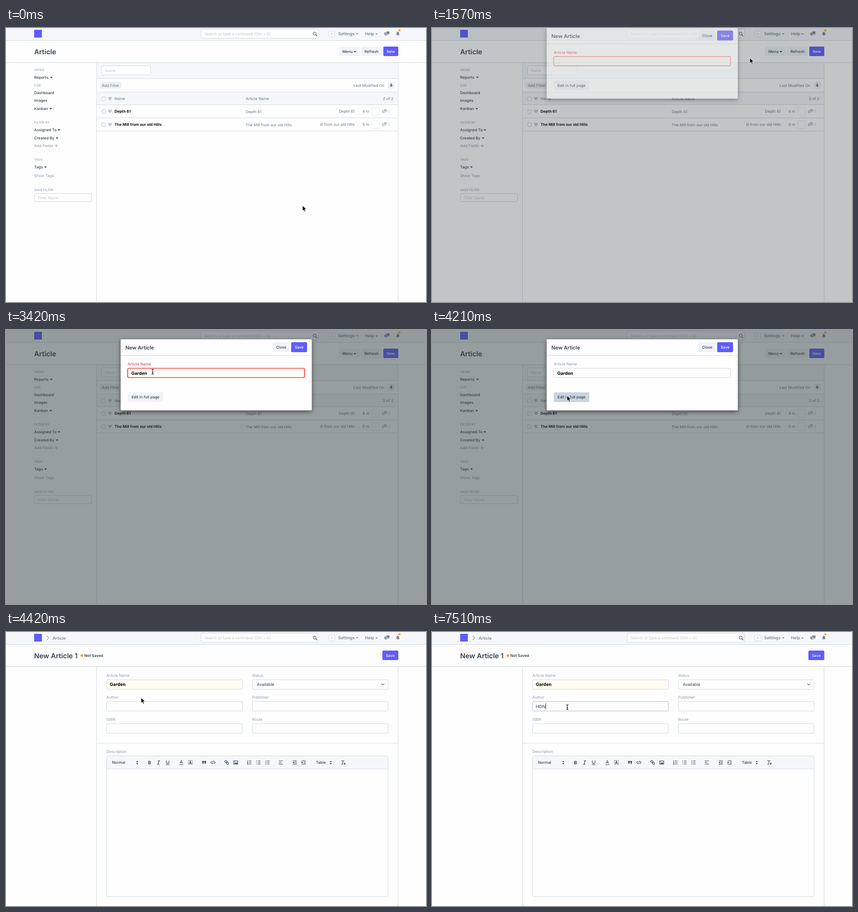
Animation, 925 px wide and 605 px high, one loop 7990 ms. Source, as an HTML page:

```html
<!DOCTYPE html>
<html lang="en">
<head>
<meta charset="utf-8">
<title>New article</title>
<style>
html, body { margin: 0; width: 925px; height: 605px; overflow: hidden; background: #fefefe; }
svg { display: block; font-family: Inter, "Noto Sans", sans-serif; text-rendering: geometricPrecision; }
text { white-space: pre; }
.sheet { filter: drop-shadow(0 3.5px 5px rgba(0, 0, 0, .55)); }
</style>
</head>
<body>
<svg id="stage" width="925" height="605" viewBox="0 0 925 605"></svg>
<script>
const LOOP = 7990;
const INK = '#36414c', GRAY = '#8d99a6', PALE = '#c3cad1', LINE = '#d1d8dd';
const BAR = '#f5f7fa', PAGE = '#fefefe', BLUE = '#5e5cff', BTN = '#f0f4f7', RED = '#f5363b';

// Building blocks; text is placed by the middle of its capitals
const T = (x, mid, s, o = {}) => {
  const { size = 8.4, fill = INK, w = 400, end, id } = o;
  return `<text ${id ? `id="${id}"` : ''} x="${x}" y="${mid + size * .364}" font-size="${size}" fill="${fill}"
    font-weight="${w}" text-anchor="${end === 'mid' ? 'middle' : end ? 'end' : 'start'}">${s}</text>`;
};
const R = (x, y, w, h, fill, o = {}) =>
  `<rect x="${x}" y="${y}" width="${w}" height="${h}" fill="${fill}" rx="${o.r || 0}"
    stroke="${o.line || 'none'}" stroke-width="${o.lw || 1}" ${o.more || ''}/>`;
const P = (d, color = INK, w = 1, more = '') =>
  `<path d="${d}" fill="none" stroke="${color}" stroke-width="${w}" ${more}/>`;
const F = (d, fill = INK) => `<path d="${d}" fill="${fill}"/>`;
const down = (x, y, fill = INK) => F(`M${x - 3} ${y - 1.4}h6l-3 3.2z`, fill);
const field = (x, y, w, h, o = {}) =>
  R(x + .5, y + .5, w - 1, h - 1, o.fill || PAGE, { r: 2.5, line: o.line || LINE, more: o.more });
const button = (x, y, w, h, s, o = {}) =>
  R(x, y, w, h, o.fill || BTN, { r: 2.5, more: o.id ? `id="${o.id}"` : '' }) +
  T(o.tx || x + w / 2, y + h / 2, s, { end: 'mid', fill: o.ink || INK, w: 500 });
const chat = (x, y, c) =>
  F(`M${x + 4} ${y}h7v5.5h-1.2v2.2l-2.2-2.2h-3.6z`, c) +
  F(`M${x} ${y + 2.5}h3.2v3.8h4v1.6h-3l-2.2 2v-2h-2z`, c);
const heart = (x, y) =>
  F(`M${x} ${y + 4}C${x - 8} ${y - 1.5} ${x - 3} ${y - 6.5} ${x} ${y - 2.4}C${x + 3} ${y - 6.5} ${x + 8} ${y - 1.5} ${x} ${y + 4}z`, PALE);
const check = y => R(210.8, y - 3.6, 8, 8, PAGE, { r: 1.8, line: '#bcc4cb' });

function navbar() {
  return R(0, 0, 925, 27, BAR) + P('M0 27.5H925', LINE) +
    R(62, 4, 17, 17, BLUE) +
    field(429, 2, 260, 21) +
    T(437, 13, 'Search or type a command (Ctrl + G)', { fill: '#bcc3ca' }) +
    `<circle cx="679.8" cy="12.3" r="3.3" fill="none" stroke="${INK}"/>` + P('M682.2 14.8l3.2 3.2', INK, 1.3) +
    R(711, 6.5, 13, 13, PAGE, { r: 2, line: LINE }) +
    T(717.5, 13, 'A', { end: 'mid', fill: PALE }) +
    T(731.5, 13, 'Settings', { size: 9.1, w: 600, fill: '#7b8793' }) + down(773.5, 13, GRAY) +
    T(790.5, 13, 'Help', { size: 9.1, w: 600, fill: '#7b8793' }) + down(816, 13.4, GRAY) +
    chat(833.5, 7.6, '#7b8793') +
    F('M859 15.6c1.4-1.2 1-3 1.4-4.8c.4-1.8 1.4-2.4 2.6-2.6c1.2.2 2.2.8 2.6 2.6c.4 1.8 0 3.6 1.4 4.8zM861.8 16.2h2.4c-.2 1.4-2.2 1.4-2.4 0z', '#7b8793') +
    '<circle cx="866.5" cy="5.2" r="2.3" fill="#ff9c00"/>' +
    P('M0 76.5H925', LINE);
}

function sidebar() {
  const heads = [[92, 'VIEWS'], [208, 'FILTER BY'], [290, 'TAGS'], [357, 'SAVE FILTER']];
  const links = [[109, 'Reports', 100], [126, 'List'], [143, 'Dashboard'], [160, 'Images'], [178, 'Kanban', 98.5],
    [225, 'Assigned To', 116.5], [243, 'Created By', 112.5], [260, 'Add Fields'], [307, 'Tags', 87], [326, 'Show Tags']];
  const dim = ['List', 'Add Fields', 'Show Tags'];
  return heads.map(([y, s]) => T(62, y, s, { size: 7, fill: GRAY })).join('') +
    links.map(([y, s, c]) => T(62, y, s, { fill: dim.includes(s) ? GRAY : INK, w: dim.includes(s) ? 400 : 500 }) +
      (c ? down(c, y + .2) : '')).join('') +
    P('M107.5 260h6.4M110.7 256.8v6.4', GRAY) +
    field(62, 365, 127, 19) + T(70, 375, 'Filter Name', { fill: PALE });
}

function listRow(y, name, age, clip) {
  return check(y) + heart(229, y) +
    T(239, y, name, { w: 700, fill: '#111' }) +
    T(528, y + 1, name, { fill: '#6c7680' }) +
    `<g clip-path="url(#cut)">${T(768, y, clip, { end: 1, fill: '#6c7680' })}</g>` +
    T(800, y, age, { end: 1, fill: '#6c7680' }) +
    R(805.5, y - 8.2, 17, 17, 'none', { r: 2, line: LINE, more: 'stroke-dasharray="2 1.4"' }) +
    chat(828, y - 5, PALE) + T(841, y, '0', { fill: PALE }) +
    P(`M200 ${y + 14.5}H863`, LINE);
}

function listPage() {
  return T(62, 52, 'Article', { size: 15.2, w: 600 }) +
    button(734, 41, 45, 21, 'Menu', { tx: 752 }) + down(768.5, 52.4) +
    button(782, 41, 46, 21, 'Refresh') +
    button(831, 41, 33, 21, 'New', { fill: BLUE, ink: '#fff', id: 'newBtn' }) +
    sidebar() +
    R(200, 77, 663, 34, BAR) + R(200, 142, 663, 28, BAR) +
    P('M199.5 77V605M863.5 77V605M200 111.5H863M200 141.5H863M200 169.5H863', LINE) +
    field(210, 83, 109, 21) + T(218, 94, 'Name', { fill: PALE }) +
    R(207, 119, 47, 15, '#edf1f4', { r: 2 }) + T(211, 127, 'Add Filter', { fill: '#6c7680' }) +
    T(833, 127, 'Last Modified On', { end: 1, fill: '#6c7680' }) +
    R(841, 119, 15, 15, '#edf1f4', { r: 2 }) +
    F('M847 122.5h2.6v3.6h2.4l-3.7 4.2l-3.7-4.2h2.4z', '#6c7680') +
    check(156) + heart(229, 156) +
    T(239, 156, 'Name', { fill: '#6c7680' }) + T(528, 156, 'Article Name', { fill: '#6c7680' }) +
    T(853, 156, '2 of 2', { end: 1, fill: '#6c7680' }) +
    listRow(184, 'Depth 61', '4 m', 'Depth 61') +
    listRow(213, 'The Mill from our old Hills', '5 m', 'Mill from our old Hills');
}

function toolbar() {
  const bars = (x, w, dy = 3.4) => [-1, 0, 1].map(i => `M${x} ${288 + i * dy}h${w}`).join('');
  const upDown = x => F(`M${x - 2.3} 287.2h4.6l-2.3-3zM${x - 2.3} 289.4h4.6l-2.3 3z`);
  const quote = x => F(`M${x} 284.8h3.6v3.4l-1.6 3.2h-1.6l1-3.2h-1.4z`);
  const icon = (x, s, w, more = '') =>
    `<text x="${x}" y="291.6" font-size="10" font-weight="${w}" text-anchor="middle" fill="${INK}" ${more}>${s}</text>`;
  const dent = (x, tip) => P(`M${x - 4.5} 284.2h9M${x} 286.8h4.5M${x} 289.4h4.5M${x - 4.5} 292h9`) +
    F(tip < 0 ? `M${x - 1.4} 285.8v4.6l-3.2-2.3z` : `M${x - 4.5} 285.8v4.6l3.2-2.3z`);
  return T(233.5, 288.2, 'Normal', { w: 500 }) + upDown(289) +
    icon(316, 'B', 700) +
    P('M334.6 284.4h4.4M333 291.8h4.4M337 284.4l-2 7.4', INK, 1.2) +
    P('M353 283.8v3.8c0 4 6 4 6 0v-3.8M352 293h8', INK, 1.1) +
    P('M383 290.4l3-7l3 7M384 288.4h4M381.6 293h8.8') +
    R(401.8, 283.8, 8.6, 8.6, 'none', { line: INK, lw: .9, more: 'stroke-dasharray="1.3 .7"' }) +
    P('M403.7 291l2.4-5.8l2.4 5.8M404.5 289.4h3.2', INK, 1.1) +
    quote(432) + quote(436.8) +
    P('M453.6 285.2l-2.8 2.9l2.8 2.9M458 285.2l2.8 2.9l-2.8 2.9M456.8 284.4l-2 7.4', INK, 1.1) +
    `<g transform="rotate(45 486 288)">` +
      R(480.8, 286, 5.8, 4, 'none', { r: 2, line: INK, lw: 1.2 }) +
      R(485.4, 286, 5.8, 4, 'none', { r: 2, line: INK, lw: 1.2 }) + '</g>' +
    R(501.4, 284.2, 9, 7.8, 'none', { r: .6, line: INK, lw: 1.1 }) +
    F('M502.6 291l2.2-3l1.6 1.4l1.6-2.4l1.8 4z') + '<circle cx="504" cy="286.6" r=".9" fill="' + INK + '"/>' +
    P(bars(535, 5.6) + 'M532.3 283.2v2.8M531.4 287h1.6l-1.6 2.2h1.8M531.4 290.4h1.6v2.4h-1.6') +
    P(bars(554.6, 6) + bars(551.2, 1.6)) +
    P(bars(575, 5.6) + [-1, 0, 1].map(i => `M571 ${288 + i * 3.4}l1 1l1.6-2`).join('')) +
    P('M600.8 284.4h9M600.8 288h6M600.8 291.6h9') +
    dent(636, -1) + dent(655.5, 1) +
    T(682.5, 288.2, 'Table', { w: 500 }) + upDown(715.3) +
    P('M738.4 284.2h7M742.4 284.2l-1.8 7.8M738.6 292.2h3.6M744 289l3.6 3.6M747.6 289l-3.6 3.6', INK, 1.1);
}

function formPage() {
  const cells = [[221, 95.5, 'Article Name'], [542, 95.5, 'Status'], [221, 144, 'Author'],
    [542, 144, 'Publisher'], [221, 193, 'ISBN'], [542, 193, 'Route']];
  return P('M89.5 8.2l4.8 4.8l-4.8 4.8', GRAY, 1.1) +
    T(102.5, 13.4, 'Article', { size: 9.1, w: 600, fill: '#7b8793' }) +
    T(62, 52, 'New Article 1', { size: 15.2, w: 600 }) +
    '<circle cx="167" cy="52" r="2.8" fill="#ff9c00"/>' +
    T(172.5, 52, 'Not Saved', { w: 600 }) +
    button(829, 41, 35, 21, 'Save', { fill: BLUE, ink: '#fff' }) +
    P('M199.5 77V605M863.5 77V605M200 245.5H863', LINE) +
    cells.map(([x, y, s]) => T(x, y, s, { fill: GRAY }) + field(x, Math.round(y + 9), 300, 22, {
      fill: s === 'Article Name' ? '#fffdf2' : PAGE, more: s === 'Author' ? 'id="authorBox"' : '' })).join('') +
    T(228.5, 115.5, 'Garden', { size: 9.8, w: 700, fill: '#000' }) +
    T(552.5, 115.5, 'Available', { size: 9.1 }) +
    P('M826.6 113.8l3.2 3.2l3.2-3.2', '#6c7680', 1.3) +
    T(228.5, 164.5, '', { size: 9.8, id: 'author' }) + R(0, 157.5, .9, 13, '#000', { more: 'id="authorCaret"' }) +
    T(221, 264, 'Description', { fill: GRAY }) +
    R(221.5, 273.5, 620, 311, PAGE, { r: 2.5, line: LINE }) +
    R(222, 274, 619, 28.5, BAR) + P('M222 302.5H841', LINE) + toolbar();
}

function dialog() {
  return R(252.5, 20.5, 421, 157, PAGE, { r: 2, more: 'class="sheet"' }) +
    P('M253 56.5H673', LINE) +
    T(263, 39.3, 'New Article', { size: 11.2, w: 600 }) +
    button(587, 27, 38, 22, 'Close') +
    button(628, 27, 35, 22, 'Save', { fill: BLUE, ink: '#fff' }) +
    T(268, 75, 'Article Name', { id: 'label' }) +
    R(268, 84.5, 389.5, 20.5, '#fffdf4', { r: 2.5, line: RED, more: 'id="nameBox"' }) +
    T(276, 95.2, '', { size: 9.8, w: 700, fill: '#000', id: 'name' }) +
    R(0, 88.3, .9, 13, '#000', { more: 'id="nameCaret"' }) +
    button(268, 137.5, 78.5, 21.5, 'Edit in full page', { id: 'editBtn' });
}

document.getElementById('stage').innerHTML =
  '<defs><clipPath id="cut"><rect x="692" y="170" width="80" height="60"/></clipPath></defs>' +
  R(0, 0, 925, 605, PAGE) + navbar() +
  `<g id="list">${listPage()}</g><g id="form">${formPage()}</g>` +
  R(0, 0, 925, 605, '#334143', { more: 'id="shade"' }) +
  `<g id="dialog">${dialog()}</g>
  <g id="arrow"><path d="M0 0V12L2.8 9.5L4.7 13.6L6.7 12.7L4.9 8.6H8.6Z" fill="#000" stroke="#fff" stroke-width=".9"/></g>
  <g id="beam">` +
  ['#fff', '#000'].map((c, i) =>
    P('M-2.6-5.5Q0-5.5 0-3.8Q0-5.5 2.6-5.5M0-4V4M-2.6 5.5Q0 5.5 0 3.8Q0 5.5 2.6 5.5M-1.3 1.4H1.3', c, i ? 1.1 : 2.4)).join('') + '</g>';

// Tables of [start, value...]; each value holds until the next start
const POINTER = [
  [0, 653, 392], [360, 681, 312], [500, 727, 236], [620, 781, 148], [740, 822, 82], [850, 840, 54], [970, 846, 46],
  [1090, 847, 44], [1570, 700, 66], [1650, 489, 96, 1], [1920, 462, 108, 1], [2040, 420, 116, 1], [2150, 372, 108, 1],
  [2270, 335, 96, 1], [2390, 323, 92, 1], [3750, 321, 98, 1], [3870, 312, 122], [3990, 302, 139], [4110, 297.5, 145],
  [4650, 318, 129], [4770, 314, 121, 1], [4890, 304, 121, 1], [5130, 303, 129], [5250, 301, 140], [5360, 299, 157, 1],
  [5470, 298, 163, 1], [5580, 298, 166, 1]];
const NAME = [[0, ''], [1920, '|'], [2630, 'G|'], [2860, 'Ga|'], [2960, 'Ga'], [3060, 'Gar|'], [3300, 'Garde|'], [3420, 'Garden']];
const AUTHOR = [[0, ''], [5690, '|'], [6250, ''], [6850, 'H'], [7300, 'HD|'], [7410, 'HD'], [7510, 'HDN|']];
const NEW_FILL = [[0, BLUE], [850, '#3d36ff'], [1450, '#2f1dff'], [1570, BLUE]];
const EDIT_FILL = [[0, BTN], [3990, '#d4dde6'], [4210, '#c9d4e2']];
// opacity of dialog and shade, vertical shift of dialog
const DIALOG = [[0, 0, -39], [1570, .6, -21.5], [1650, 1, -7], [1770, 1, 0], [4330, .5, -14.6], [4420, 0, -39]];

const at = (table, t) => table.findLast(row => row[0] <= t).slice(1);
const $ = id => document.getElementById(id);
const set = (id, attrs) => { for (const k in attrs) $(id).setAttribute(k, attrs[k]); };
const show = (id, on) => set(id, { visibility: on ? 'visible' : 'hidden' });

function type(id, x, value) {
  const node = $(id);
  node.textContent = value.replace('|', '');
  set(id + 'Caret', { x: x + node.getComputedTextLength(), opacity: value.endsWith('|') ? 1 : 0 });
}

function draw(t) {
  const [x, y, beam] = at(POINTER, t);
  show('arrow', !beam);
  show('beam', beam);
  set(beam ? 'beam' : 'arrow', { transform: `translate(${x} ${y})` });

  show('list', t < 4330);
  show('form', t >= 4330);
  set('newBtn', { fill: at(NEW_FILL, t)[0] });

  const [alpha, shift] = at(DIALOG, t);
  set('shade', { opacity: alpha / 2 });
  set('dialog', { opacity: alpha, transform: `translate(0 ${shift})` });
  const done = t >= 4210, focus = t >= 1920 && !done;
  set('label', { fill: done ? GRAY : RED });
  set('nameBox', { stroke: done ? LINE : RED, 'stroke-width': focus ? 1.7 : 1, fill: done ? PAGE : '#fffdf4' });
  set('editBtn', { fill: at(EDIT_FILL, t)[0] });
  type('name', 276, at(NAME, t)[0]);

  set('authorBox', { stroke: t >= 5580 ? '#b3bac1' : LINE });
  type('author', 228.5, at(AUTHOR, t)[0]);
}

const start = performance.now();
function tick() {
  draw((performance.now() - start) % LOOP);
  requestAnimationFrame(tick);
}
tick();
</script>
</body>
</html>
```
